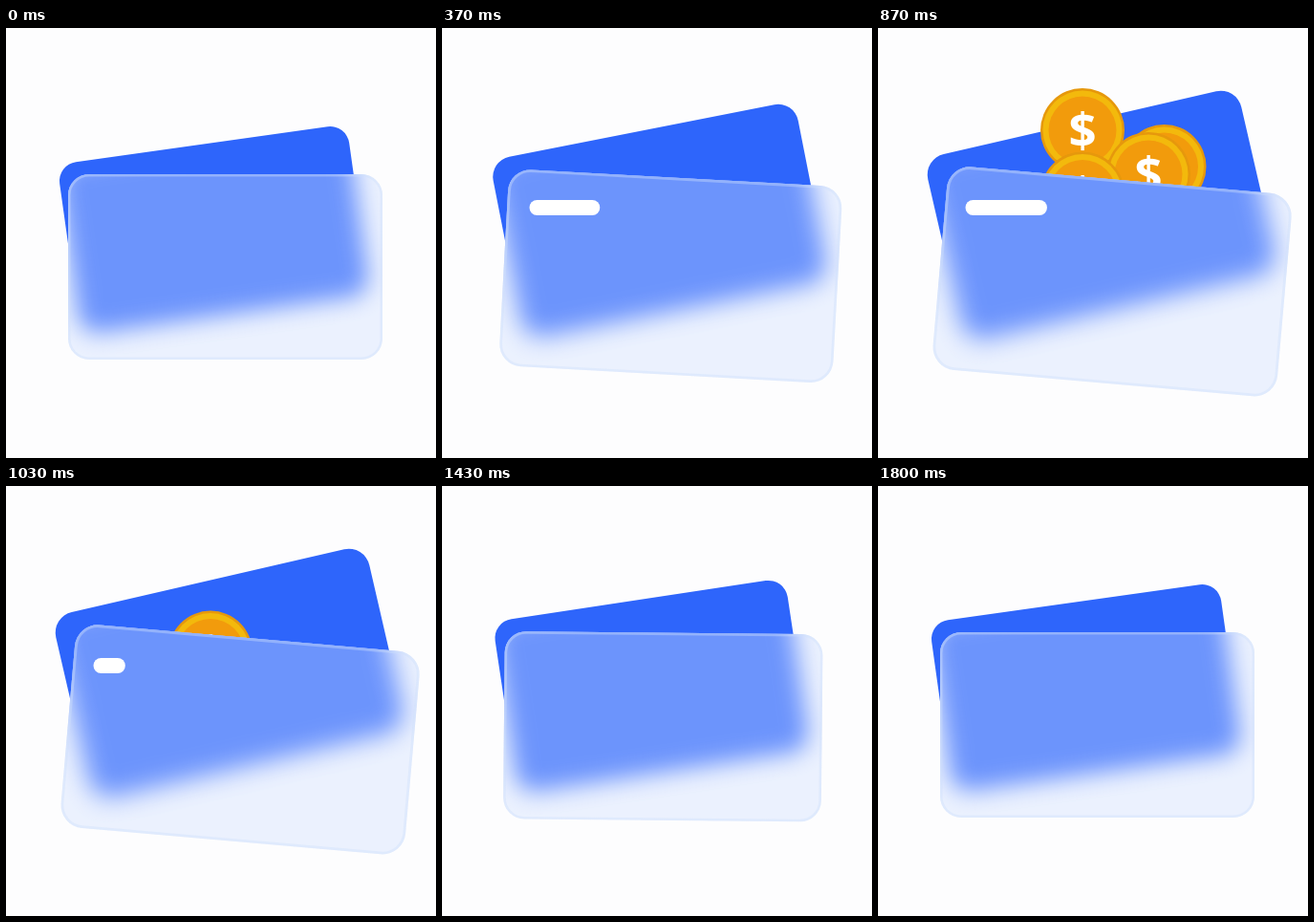
Recreate the animation shown at these times as an HTML page. Size 450 px wide and 450 px high, loop 1.83 s.

```html
<!DOCTYPE html>
<html lang="en">
<head>
<meta charset="utf-8">
<title>Glass wallet</title>
<style>
  html, body { margin: 0; width: 100%; height: 100%; overflow: hidden; background: #fdfdfe; }
  svg { display: block; width: 100%; height: 100%; }
  text { font: 700 51px "Open Sans", "Noto Sans", sans-serif; fill: #fff; text-anchor: middle; }
</style>
</head>
<body>
<svg viewBox="0 0 450 450">
  <defs>
    <rect id="backShape" x="-153" y="-90" width="306" height="180" rx="20" fill="#2e65fb"/>
    <filter id="blur" x="-20%" y="-30%" width="140%" height="160%" color-interpolation-filters="sRGB">
      <feGaussianBlur stdDeviation="12"/>
    </filter>
    <clipPath id="glassClip">
      <rect class="glass" x="-164.5" y="-97" width="329" height="194" rx="22"/>
    </clipPath>
    <g id="coin">
      <circle r="44" fill="#e6980c"/>
      <circle r="41.5" fill="#f3b90c"/>
      <circle r="35.5" fill="#f29b0c"/>
      <text y="18">$</text>
    </g>
  </defs>

  <use class="back" href="#backShape"/>

  <g id="coins">
    <use href="#coin" x="214" y="107"/>
    <use href="#coin" x="299.5" y="145"/>
    <use href="#coin" x="283" y="153"/>
    <use href="#coin" x="214" y="173.5"/>
  </g>

  <g clip-path="url(#glassClip)">
    <rect width="450" height="450" fill="#fdfdfe"/>
    <g class="back"><use href="#backShape" filter="url(#blur)"/></g>
    <rect width="450" height="450" fill="#cedefb" fill-opacity=".39"/>
  </g>
  <rect class="glass" x="-163.25" y="-95.75" width="326.5" height="191.5" rx="20.75"
        fill="none" stroke="#cddff9" stroke-opacity=".4" stroke-width="2.5"/>

  <path id="pill" stroke="#fff" stroke-width="16" stroke-linecap="round"/>
</svg>
<script>
  const LOOP = 1830;
  const backs = document.querySelectorAll(".back");
  const glasses = document.querySelectorAll(".glass");
  const coins = document.getElementById("coins");
  const pill = document.getElementById("pill");

  const ramp = (t, from, to) => {
    const p = Math.min(1, Math.max(0, (t - from) / (to - from)));
    return p * p * (3 - 2 * p);
  };
  const pulse = (t, inFrom, inTo, outFrom, outTo) =>
    ramp(t, inFrom, inTo) - ramp(t, outFrom, outTo);
  const mix = (a, b, k) => a + (b - a) * k;

  function pose(nodes, from, to, k) {
    const [x, y, angle, scale] = from.map((v, i) => mix(v, to[i], k));
    const transform = `translate(${x} ${y}) rotate(${angle}) scale(${scale})`;
    nodes.forEach(node => node.setAttribute("transform", transform));
  }

  function draw(t) {
    const open = pulse(t, 0, 633, 1115, 1515);
    pose(backs, [217.4, 210.9, -8, 1], [233.6, 195.6, -13, 1.1], open);
    pose(glasses, [229.5, 250, 0, 1], [245.1, 265.4, 5, 1.1], open);

    const length = 92 * pulse(t, 0, 633, 742, 1142);
    pill.setAttribute("d", `M99.5 188h${length}`);
    pill.style.display = length > 0.1 ? "" : "none";

    const lift = pulse(t, 580, 850, 890, 1150);
    coins.setAttribute("transform", `translate(0 ${120 * (1 - lift)})`);
    coins.style.display = lift > 0.001 ? "" : "none";
  }

  const start = performance.now();
  function tick() {
    draw((performance.now() - start) % LOOP);
    requestAnimationFrame(tick);
  }
  draw(0);
  requestAnimationFrame(tick);
</script>
</body>
</html>
```
